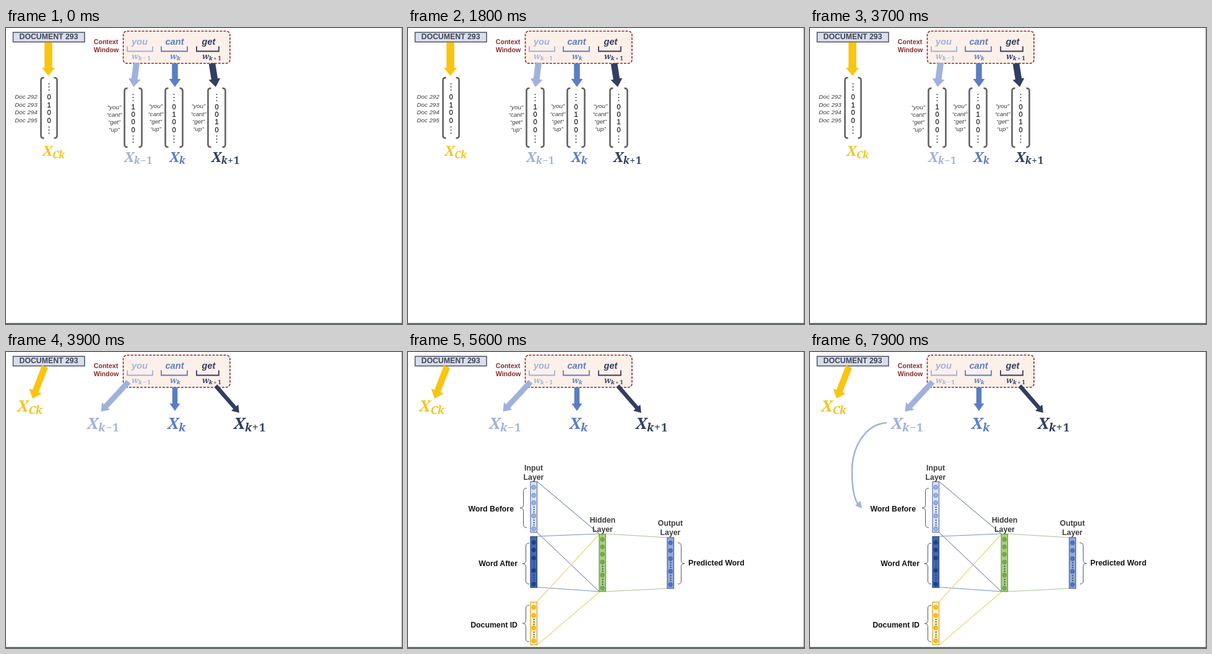
Write an HTML page that moves like this. It is 640 by 477 pixels and loops after 8000 ms.

```html
<!DOCTYPE html>
<html lang="en">
<head>
<meta charset="utf-8">
<title>Document vectors</title>
<style>
html, body { margin: 0; width: 100%; height: 100%; overflow: hidden; background: #fff; }
svg { display: block; width: 100vw; height: 100vh; }
text { font-family: "Liberation Sans", Arial, sans-serif; }
.bold { font-weight: 700; }
.ital { font-style: italic; }
.digit { stroke: #222; stroke-width: .3px; }
.math { font-family: "Noto Serif", "Liberation Serif", serif; font-weight: 700; }
.line { fill: none; }
.vectors { animation: leave 8s step-end infinite; }
.compact { animation: enter-compact 8s step-end infinite; }
.network { animation: enter-network 8s step-end infinite; }
.feed { animation: enter-feed 8s step-end infinite; }
@keyframes leave { 0% { visibility: visible; } 47.45%, 100% { visibility: hidden; } }
@keyframes enter-compact { 0% { visibility: hidden; } 47.45%, 100% { visibility: visible; } }
@keyframes enter-network { 0% { visibility: hidden; } 69.95%, 100% { visibility: visible; } }
@keyframes enter-feed { 0% { visibility: hidden; } 87.45%, 100% { visibility: visible; } }
</style>
</head>
<body>
<svg id="stage" viewBox="0 0 640 477" preserveAspectRatio="none"></svg>
<script>
const GOLD = '#fac40f', PALE = '#a0b2dc', BLUE = '#5b7ec4', NAVY = '#323e62', RED = '#8c2b2c', INK = '#3d3d3d';

const text = (x, y, size, fill, str, cls = '', anchor = 'middle') =>
  `<text x="${x}" y="${y}" font-size="${size}" fill="${fill}" class="${cls}" text-anchor="${anchor}">${str}</text>`;
const line = (d, color, width = 1) =>
  `<path class="line" d="${d}" stroke="${color}" stroke-width="${width}"/>`;
const dot = (x, y, r, fill, stroke = 'none') =>
  `<circle cx="${x}" cy="${y}" r="${r}" fill="${fill}" stroke="${stroke}" stroke-width=".7"/>`;
const rect = (x, y, w, h, fill, stroke, width, extra = '') =>
  `<rect x="${x}" y="${y}" width="${w}" height="${h}" fill="${fill}" stroke="${stroke}" stroke-width="${width}" ${extra}/>`;
const group = (cls, ...parts) => `<g class="${cls}">${parts.join('')}</g>`;

// Block arrow from tail to tip
function arrow(x1, y1, x2, y2, color, shaft, head, headLen) {
  const len = Math.hypot(x2 - x1, y2 - y1), angle = Math.atan2(y2 - y1, x2 - x1) * 180 / Math.PI;
  const s = shaft / 2, h = head / 2, n = len - headLen;
  return `<path fill="${color}" transform="translate(${x1} ${y1}) rotate(${angle})"
    d="M0 ${-s}H${n}V${-h}L${len} 0L${n} ${h}V${s}H0Z"/>`;
}

// Letter with a subscript; first and step are in units of the size
function symbol(letter, sub, x, y, size, color, first = .73, step = .46) {
  const parts = [...sub].map((c, i) =>
    text(x + size * (first + i * step), y + size * .16, size * .73, color, c,
      'math' + (/[a-z]/i.test(c) ? ' ital' : ''), 'start'));
  return text(x, y, size, color, letter, 'math ital', 'start') + parts.join('');
}

const vdots = (x, y, gap = 5, r = .95, fill = '#333') =>
  [0, 1, 2].map(i => dot(x, y + i * gap, r, fill)).join('');

function vector(x, top, bottom, first, step, hot, half) {
  const side = s => line(`M${x + s * (half - 5)} ${top}Q${x + s * half} ${top} ${x + s * half} ${top + 4}
    V${bottom - 4}Q${x + s * half} ${bottom} ${x + s * (half - 5)} ${bottom}`, '#626262', 2.6);
  const digits = [0, 1, 2, 3].map(i =>
    text(x, first + i * step, 11, '#222', i === hot ? 1 : 0, 'digit')).join('');
  return side(-1) + side(1) + vdots(x, top + 10) + digits + vdots(x, bottom - 18);
}

const labels = (list, x, y, step) =>
  list.map((s, i) => text(x, y + i * step, 9.8, '#3c3c3c', s, 'ital')).join('');

function layer(x, y, h, fill, stroke, node, nodes, gaps) {
  return rect(x, y, 10.5, h, fill, stroke, 1.2)
    + nodes.map(cy => dot(x + 5.2, cy, 3.4, node, stroke)).join('')
    + gaps.map(cy => vdots(x + 5.6, cy, 3.9, 1, '#26314f')).join('');
}

// Curly brace; dir -1 points left, 1 points right
function brace(x, top, bottom, dir) {
  const mid = (top + bottom) / 2, a = x + dir * 5.5, b = x + dir * 11;
  return line(`M${x} ${top}Q${a} ${top} ${a} ${top + 5}V${mid - 5}Q${a} ${mid} ${b} ${mid}
    Q${a} ${mid} ${a} ${mid + 5}V${bottom - 5}Q${a} ${bottom} ${x} ${bottom}`, '#555');
}

const title = (x, y, a, b) => text(x, y, 12.3, INK, a, 'bold') + text(x, y + 15, 12.3, INK, b, 'bold');
const caption = (x, y, str, anchor = 'end') => text(x, y, 12.3, '#111', str, 'bold', anchor);

const words = [
  { word: 'you', x: 216, left: 196, right: 237, color: PALE, sub: 'k−1', wx: 203 },
  { word: 'cant', x: 272.5, left: 251, right: 293, color: BLUE, sub: 'k', wx: 265 },
  { word: 'get', x: 327.5, left: 308, right: 344, color: NAVY, sub: 'k+1', wx: 317 }
];

const header = group('',
  rect(11.5, 7, 115.5, 15.5, '#d9deea', '#4b5265', 1.5),
  text(69, 18.2, 12.3, '#3f4659', 'DOCUMENT 293', 'bold'),
  rect(189.5, 5, 172.5, 52, '#fdf0e9', RED, 1.6, 'rx="6" stroke-dasharray="4 2"'),
  text(161.5, 26, 10.6, RED, 'Context', 'bold'),
  text(162, 39, 10.6, RED, 'Window', 'bold'),
  ...words.map(w => text(w.x, 27, 14.7, w.color, w.word, 'bold ital')
    + line(`M${w.left} 29.5V37.5H${w.right}V29.5`, w.color, 1.8)
    + symbol('w', w.sub, w.wx, 49.5, 13, w.color, .84, .56)));

const quoted = ['“you”', '“cant”', '“get”', '“up”'];
const vectors = group('vectors',
  arrow(68.5, 23, 68.5, 77, GOLD, 12.5, 21, 13),
  vector(69.5, 80, 177.5, 115.3, 12.4, 1, 13),
  labels(['Doc 292', 'Doc 293', 'Doc 294', 'Doc 295'], 32.5, 114.3, 12.4),
  symbol('X', 'Ck', 59, 206, 22, '#f0c72a'),
  arrow(211, 56, 206, 95, PALE, 10, 20, 13),
  arrow(273, 57, 273, 95, BLUE, 9.5, 19, 13),
  arrow(333, 57, 339, 95, NAVY, 10.5, 19, 13),
  ...[205.5, 271.5, 340.5].map((x, i) => vector(x, 97, 192, 131.2, 12.1, i, 14)),
  ...[175, 242, 311].map((x, i) => labels(quoted, x, i ? 129.3 : 130.5, 12.2)),
  symbol('X', 'k−1', 191, 215.5, 22, PALE),
  symbol('X', 'k', 264, 215.5, 22, BLUE),
  symbol('X', 'k+1', 332, 215.5, 22, NAVY));

const compact = group('compact',
  arrow(63, 23.5, 43, 75, GOLD, 10.5, 22, 13),
  arrow(198, 48, 153.5, 96, PALE, 9, 18, 12),
  arrow(273, 57, 273, 95, BLUE, 8.5, 17, 12),
  arrow(339, 54.5, 377, 98, NAVY, 6.5, 15, 11),
  symbol('X', 'Ck', 18, 96, 25, '#f0c72a'),
  symbol('X', 'k−1', 131, 124, 25, PALE),
  symbol('X', 'k', 261, 124, 25, BLUE),
  symbol('X', 'k+1', 368, 124, 25, NAVY));

const network = group('network',
  line('M209 209L309 293M209 291L309 386', '#59659c'),
  line('M209 297L309 293M209 379L309 386', '#7e8dbf'),
  line('M209 402L309 294M209 472L309 387', '#ecd273', 1.2),
  line('M320 293L419 299M320 386L419 381', '#abc09d'),
  layer(198, 209, 81.5, '#dae3f4', '#5a75b5', '#9ab2e0', [218, 231, 243, 264, 285], [250, 271]),
  layer(198, 297.5, 82, '#4169b8', '#2b4684', '#233f7e', [307, 319, 332, 352, 374], [338.5, 359.5]),
  layer(198, 403, 69, '#fff0c4', '#cfa52c', '#fdbf08', [411.5, 424.5, 444.5, 465.5], [431, 451.5]),
  layer(309, 293.5, 92.5, '#a6d17c', '#6c9a48', '#72ac45', [302, 314, 326, 338.5, 359.5, 380.5], [345.5, 366.5]),
  layer(419, 299, 82, '#91abdd', '#47629f', '#4a74c6', [307.5, 320, 333, 353.5, 375], [339.5, 360.5]),
  title(203, 191, 'Input', 'Layer'),
  title(314.5, 274.5, 'Hidden', 'Layer'),
  title(424, 280, 'Output', 'Layer'),
  caption(171, 256.5, 'Word Before'),
  caption(177, 345, 'Word After'),
  caption(177, 444, 'Document ID'),
  caption(453, 344, 'Predicted Word', 'start'),
  brace(192, 219.5, 283, -1),
  brace(196, 308, 374, -1),
  brace(196, 408, 467, -1),
  brace(436, 307.5, 374, 1));

const feed = group('feed',
  line('M124 114C86 117 67 158 68 194C68 220 71 236 78 246', PALE, 2.5),
  `<path d="M84 252L73 247.5L81.5 240Z" fill="${PALE}"/>`);

const border = line('M639.5 0V477', '#a8a8a8') + line('M0 476.2H640', '#0a860f', 1.6);

document.getElementById('stage').innerHTML = header + vectors + compact + network + feed + border;
</script>
</body>
</html>
```
